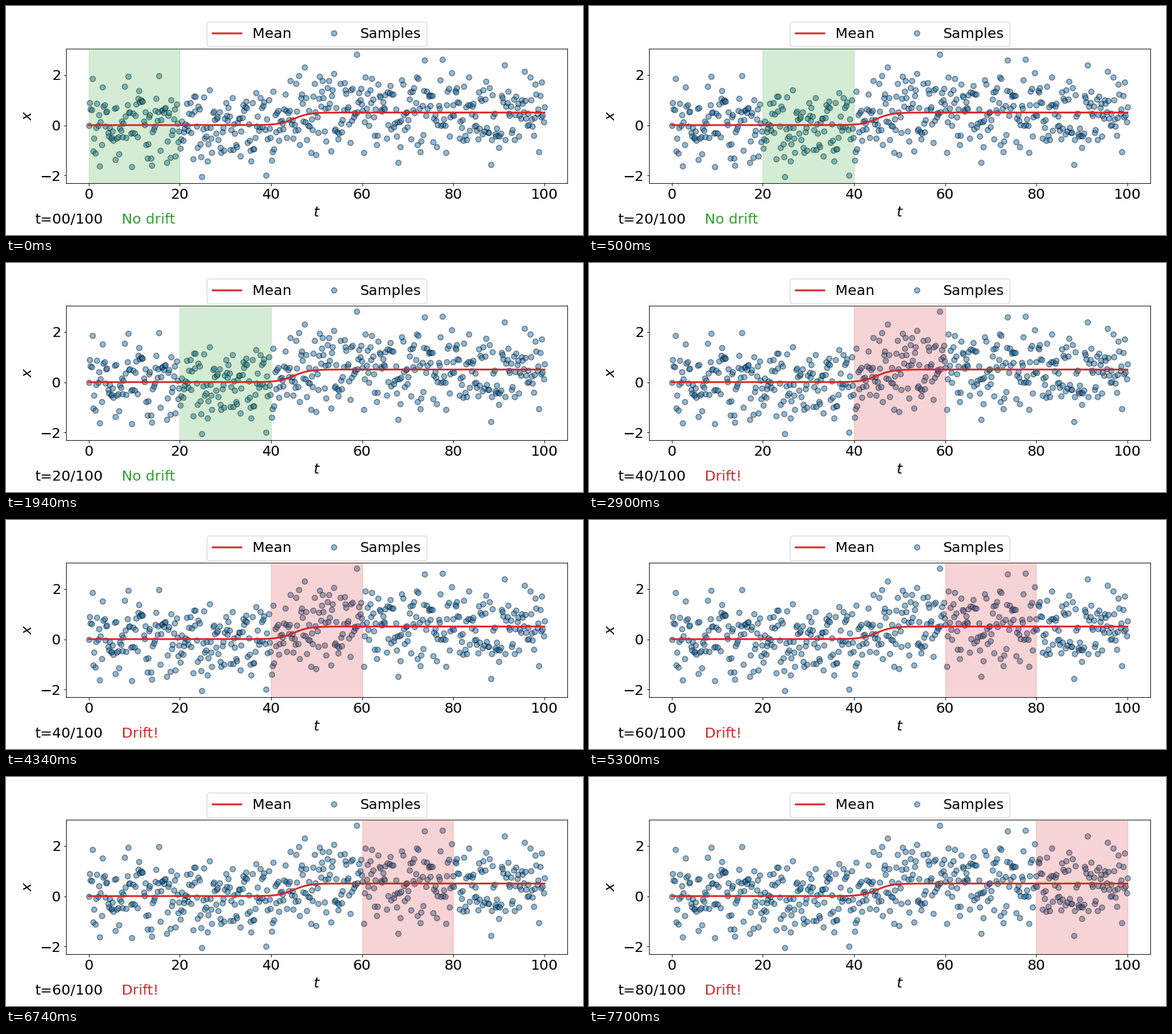
These frames come from a looping animation (808 px wide and 322 px high, 8 s). A matplotlib script:

```python
import numpy as np
import matplotlib.pyplot as plt
from matplotlib.animation import FuncAnimation

W, H = 808, 322
BLUE, GREEN, RED = "#1f77b4", "#2ca02c", "#d62728"
STEP_MS, FRAMES = 100, 80
HOLD_MS, LEAD_MS = 2400, 1900  # time per window, part of it already elapsed
WINDOW, DRIFT_START = 20, 40

# The few samples that stand out from the cloud, as (t, x).
EXTREMES = [
    (0.8, 1.85), (8.6, 1.93), (15.5, 1.96), (24.8, -2.04), (38.9, -1.99),
    (47.2, 2.3), (58.8, 2.8), (68, -1.48), (73.7, 2.58), (77.6, 2.61),
    (88.2, -1.57), (91.2, 2.38),
]

plt.rcParams.update({"font.family": "DejaVu Sans", "font.size": 20})


def mean(t):
    """Smooth rise from 0 to 0.5 around t=45."""
    return 0.5 / (1 + np.exp(-0.6 * (t - 45)))


def make_samples(n=500, sigma=0.85, limit=1.7):
    rng = np.random.default_rng(12)
    t = np.linspace(0, 100, n)
    noise = rng.normal(0, sigma, n)
    noise = np.where(np.abs(noise) > limit, noise / 2, noise)
    x = mean(t) + noise
    for when, value in EXTREMES:
        x[round(when / 100 * (n - 1))] = value
    return t, x


fig = plt.figure(figsize=(W / 72, H / 72), dpi=72, facecolor="white")
ax = fig.add_axes([83.9 / W, (H - 248.9) / H, 702 / W, 189 / H])
ax.set(xlim=(-5, 105), ylim=(-2.295, 3.035),
       xticks=range(0, 101, 20), yticks=(-2, 0, 2))

t, x = make_samples()
mean_line, = ax.plot(t, mean(t), color=RED, lw=2.5, zorder=4, label="Mean")
dots, = ax.plot(t, x, "o", ms=7.5, color=BLUE, mec="black", mew=1.1,
                alpha=0.5, zorder=2, label="Samples")
fig.legend(handles=[mean_line, dots], ncol=2, loc="center",
           bbox_to_anchor=(434.9 / W, (H - 39.2) / H))


def put(px, py, text, **style):
    return fig.text(px / W, 1 - py / H, text, **style)


put(435, 290.5, "$t$", ha="center", va="center")
put(31, 154, "$x$", ha="center", va="center", rotation=90)
clock = put(40.5, 306, "")
status = put(162.3, 306, "")

spans = [ax.axvspan(s, s + WINDOW, color=GREEN if s < DRIFT_START else RED,
                    alpha=0.2, zorder=3) for s in range(0, 100, WINDOW)]


def draw(frame):
    k = (frame * STEP_MS + LEAD_MS) // HOLD_MS
    start = k * WINDOW
    drift = start >= DRIFT_START
    for i, span in enumerate(spans):
        span.set_visible(i == k)
    clock.set_text(f"t={start:02d}/100")
    status.set_text("Drift!" if drift else "No drift")
    status.set_color(RED if drift else GREEN)
    return [*spans, clock, status]


anim = FuncAnimation(fig, draw, frames=FRAMES, interval=STEP_MS,
                     repeat=True, repeat_delay=0)
plt.show()
```
